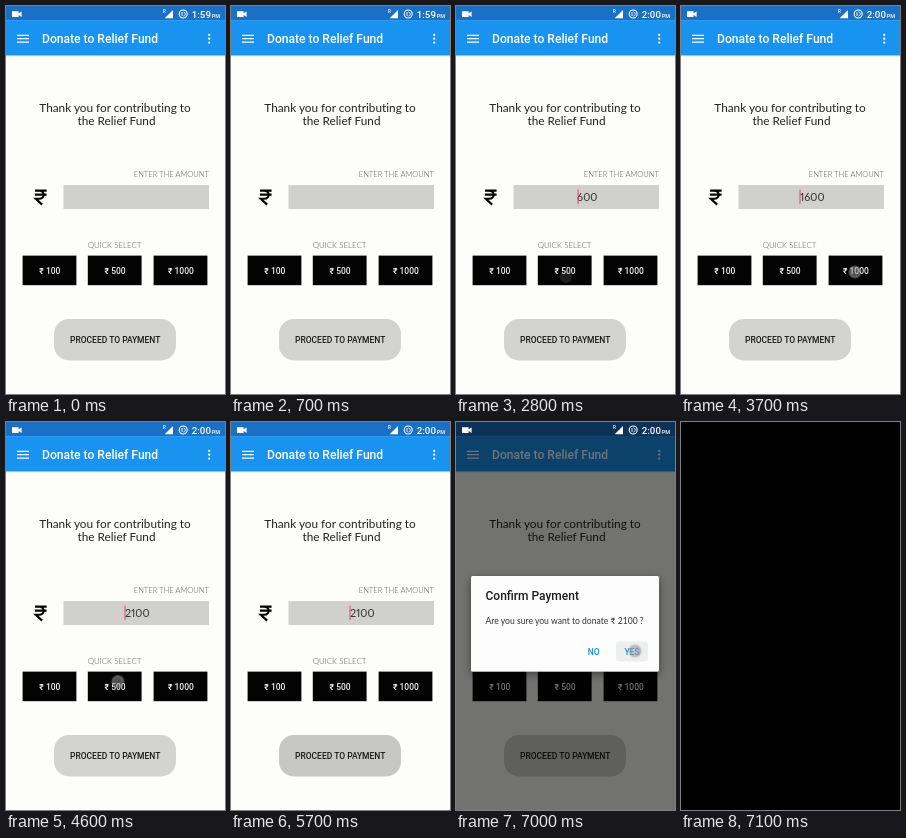
Animation, 219 px wide and 388 px high, one loop 7.2 s. Source, as an HTML page:

```html
<!DOCTYPE html>
<html lang="en">
<head>
<meta charset="utf-8">
<title>Donate</title>
<style>
  html, body { margin: 0; width: 100%; height: 100%; overflow: hidden; background: #000; }
  svg { display: block; width: 100vw; height: 100vh; }
  text { white-space: pre; }
  .ui { font-family: Roboto, sans-serif; font-weight: 500; }
  .soft { font-family: Lato, sans-serif; font-variant-ligatures: none; }
  .mid { text-anchor: middle; }
  .end { text-anchor: end; }
  .label { font-weight: 300; fill: #555; }
  .btn { font-size: 8.5px; }
  #amount { font-variant-numeric: proportional-nums; }
</style>
</head>
<body>
<svg viewBox="0 0 219 388">
  <defs>
    <filter id="shadow" x="-20%" y="-25%" width="140%" height="160%">
      <feDropShadow dx="0" dy="3" stdDeviation="4" flood-color="#000" flood-opacity=".45"/>
    </filter>
    <radialGradient id="dot">
      <stop offset="0" stop-color="#999" stop-opacity=".45"/>
      <stop offset=".75" stop-color="#999" stop-opacity=".6"/>
      <stop offset="1" stop-color="#888" stop-opacity=".25"/>
    </radialGradient>
  </defs>
  <rect width="219" height="388" fill="#fdfefc"/>

  <rect y="49" width="219" height="1.2" fill="#000" opacity=".2"/>
  <rect width="219" height="14.5" fill="#1a70c4"/>
  <rect y="14.2" width="219" height="35" fill="#1893f0"/>
  <g fill="#fff">
    <path d="M11 28.7h12v1.2h-12zM11 32.1h12v1.2h-12zM11 35.5h12v1.2h-12z"/>
    <circle cx="203.2" cy="28.8" r="1.15"/>
    <circle cx="203.2" cy="32.7" r="1.15"/>
    <circle cx="203.2" cy="36.6" r="1.15"/>
    <text class="ui" x="36" y="37" font-size="12.1">Donate to Relief Fund</text>
  </g>

  <g class="soft mid" font-size="11.8" fill="#222">
    <text x="109" y="106">Thank you for contributing to</text>
    <text x="110.5" y="119">the Relief Fund</text>
  </g>
  <text class="soft label end" x="203" y="171" font-size="7.6">ENTER THE AMOUNT</text>
  <path d="M29 184.6h11.6M29 188.6h11.6M30 184.6h3c6.2 0 6.2 8.2 0 8.2h-3.2l6.4 5.8" fill="none" stroke="#000" stroke-width="2.1"/>
  <rect x="57.5" y="179" width="145.5" height="24" fill="#d0d1cf"/>
  <text id="amount" class="soft mid" x="131.2" y="195" font-size="10.8" fill="#333"/>
  <rect id="cursor" y="183.5" width="1" height="14.5" fill="#e0466e"/>
  <text class="soft label mid" x="108.5" y="241.5" font-size="7.9">QUICK SELECT</text>
  <g id="quick"></g>
  <rect x="48" y="313" width="122" height="41.5" rx="15" fill="#d3d4d1"/>
  <rect id="press" x="48" y="313" width="122" height="41.5" rx="15" fill="#000"/>
  <text class="ui btn mid" x="109.2" y="337" fill="#1a1a1a">PROCEED TO PAYMENT</text>

  <rect id="dim" width="219" height="388"/>

  <g fill="#fff">
    <path d="M6 5.3h6.6v2l3-1.9v5.6l-3-1.9v2H6z"/>
    <path d="M167 4v8.3h-8.3z"/>
    <text class="ui" x="157" y="7" font-size="4.5">R</text>
    <circle cx="177.2" cy="8" r="4" fill="none" stroke="#fff" stroke-width="1.1"/>
    <path d="M176 6v4M177.5 6c2.3 0 2.3 4 0 4" fill="none" stroke="#fff" stroke-width=".9"/>
    <text class="ui" x="185.8" y="12" font-size="9.7"><tspan id="clock"></tspan><tspan font-size="5.5" dx=".8">PM</tspan></text>
  </g>

  <g id="dialog">
    <rect x="15" y="154" width="188" height="95.5" rx="1.5" fill="#fdfdfd" filter="url(#shadow)"/>
    <text class="ui" x="29.5" y="178" font-size="12" fill="#1c1c1c">Confirm Payment</text>
    <text class="soft" x="29.5" y="202" font-size="8.6" fill="#333">Are you sure you want to donate ₹ 2100 ?</text>
    <rect id="yes" x="160" y="219.5" width="32" height="20" rx="3" fill="#eceeef"/>
    <g class="ui btn mid" fill="#1b8be0">
      <text x="137.6" y="233">NO</text>
      <text x="176" y="233">YES</text>
    </g>
  </g>

  <circle id="touch" r="6.8" fill="url(#dot)"/>
  <rect id="black" width="219" height="388"/>
</svg>
<script>
const LOOP = 7200, STEP = 100;
const $ = id => document.getElementById(id);
const ramp = (t, a, b) => Math.min(1, Math.max(0, (t - a) / (b - a)));
const fade = (id, v) => $(id).setAttribute('opacity', v);

const quick = [[16.6, 100], [81.8, 500], [147.6, 1000]];
$('quick').innerHTML = quick.map(([x, n]) => `
  <rect x="${x}" y="249.6" width="53.8" height="29.6" fill="#030303"/>
  <text class="ui btn mid" x="${x + 27.3}" y="267.5" fill="#f4f4f4">₹ ${n}</text>`).join('');

// down and up are the times the finger lands and its mark has gone
const taps = [
  { down: 1200, up: 1700, x: 48, y: 269.5, add: 100 },
  { down: 2400, up: 2900, x: 110, y: 270.5, add: 500 },
  { down: 3500, up: 4000, x: 174, y: 266, add: 1000 },
  { down: 4400, up: 4800, x: 112, y: 259.5, add: 500 },
  { down: 5300, up: 5700, x: 112, y: 334, add: 0 },
  { down: 7000, up: 7400, x: 179, y: 229, add: 0 }
];

function draw(t) {
  $('clock').textContent = t < 800 ? '1:59' : '2:00';

  const sum = taps.reduce((s, p) => s + (t >= p.down + 200 ? p.add : 0), 0);
  $('amount').textContent = sum || '';
  fade('cursor', sum ? 1 : 0);
  $('cursor').setAttribute('x', 130.8 - String(sum).length * 3.07);

  const tap = taps.find(p => t >= p.down && t < p.up);
  fade('touch', tap ? 1 - ramp(t, tap.down + 200, tap.up) : 0);
  if (tap) {
    $('touch').setAttribute('cx', tap.x);
    $('touch').setAttribute('cy', tap.y);
  }

  fade('press', t >= 5300 ? 0.12 * (1 - ramp(t, 5500, 5900)) : 0);
  fade('dim', 0.55 * ramp(t, 5700, 6150));
  fade('dialog', ramp(t, 5700, 5900));
  fade('yes', t >= 7000 ? 1 : 0);
  fade('black', t >= 7100 ? 1 : 0);
}

const start = performance.now();
function tick() {
  const t = (performance.now() - start) % LOOP;
  draw(Math.floor(t / STEP) * STEP);
  requestAnimationFrame(tick);
}
tick();
</script>
</body>
</html>
```
